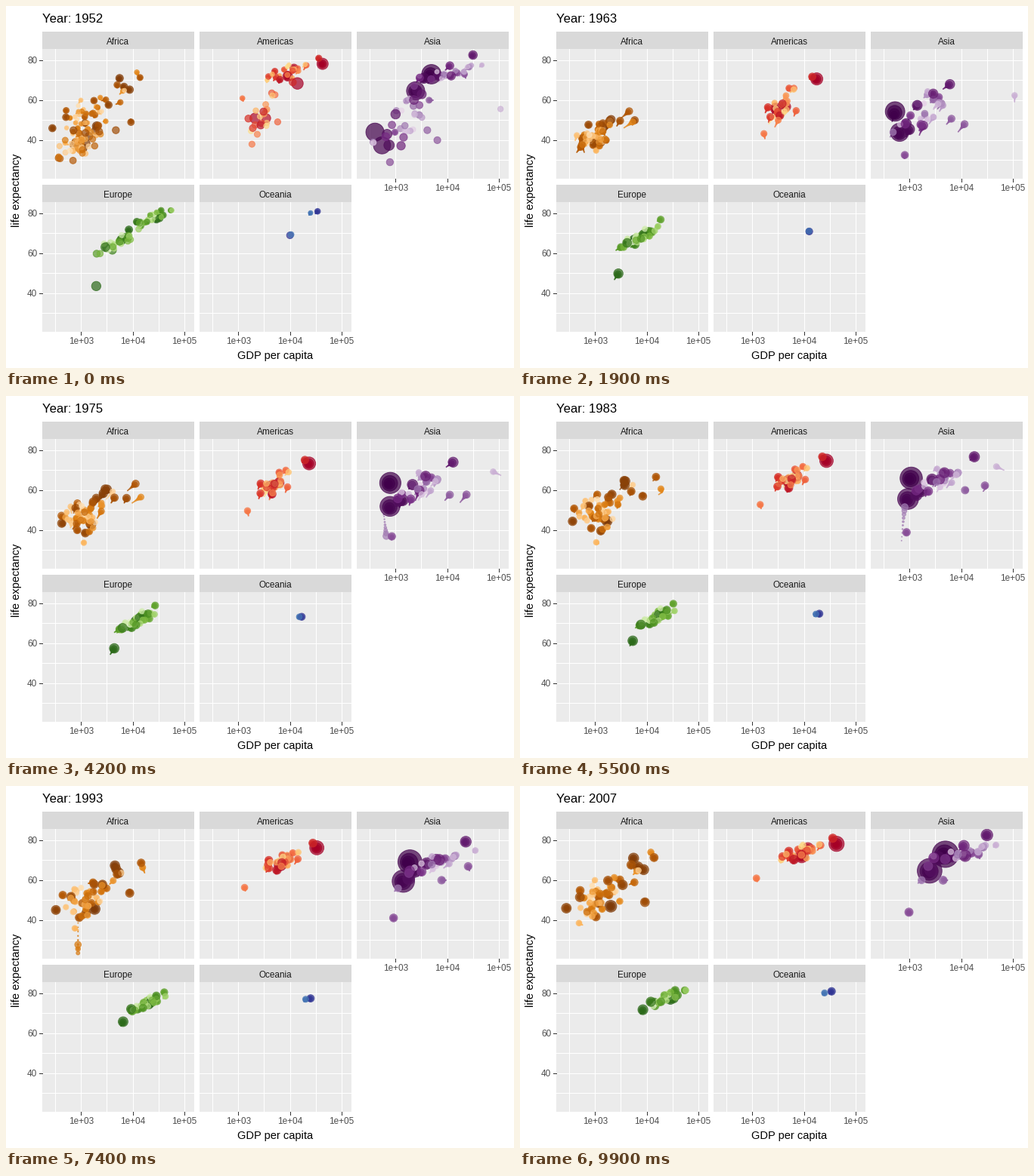
A matplotlib script for the animation above (10 s loop, 672 px wide and 480 px high).

```python
import numpy as np
import matplotlib.pyplot as plt
from matplotlib.animation import FuncAnimation
from matplotlib.colors import to_rgb
from matplotlib.patches import Rectangle

W, H, DPI = 672, 480, 96
FRAMES, WAKE = 100, 10
PX = 72 / DPI
plt.rcParams["font.family"] = "Liberation Sans"

YEARS = np.linspace(1952, 2007, FRAMES)
XLIM, YLIM = (2.24868, 5.18872), (20.649, 85.553)
PW, PH = 200.67, 172
rng = np.random.default_rng(12)


class Panel:
    """One continent; gains in life and GDP reach the given shares by midway."""

    def __init__(self, name, left, top, colors, growth, life_mid, gdp_mid):
        self.name, self.left, self.top = name, left, top
        self.colors, self.growth = colors.split(), growth
        self.mid = np.array([gdp_mid, life_mid])
        self.tracks = []

    def track(self, pop, points, dip=None):
        """Follow (log GDP, life) points spread evenly over the years."""
        points = np.array(points, float)
        if len(points) == 2:
            a, b = points
            points = np.array([a, a + (b - a) * self.mid, b])
        t = np.linspace(1952, 2007, len(points))
        x, y = (np.interp(YEARS, t, p) for p in points.T)
        if dip:
            year, depth = dip
            y = y - depth * np.clip(1 - abs(YEARS - year) / 6, 0, 1)
        p = pop * self.growth ** ((2007 - YEARS) / 55)
        size = 2 + 10 * np.sqrt(np.clip(p / 1318.7, 0, 1))
        self.tracks.append((pop, x, y, size))

    def add(self, pop, *values, dip=None):
        """Population in millions, then GDP and life pairs."""
        self.track(pop, list(zip(np.log10(values[::2]), values[1::2])), dip)

    def cloud(self, n, pops, gdp, life, gain, end, jitter=.3, rich=0):
        """Random countries: gdp (mean, sd), life (mean, slope, sd),
        gain in log GDP (mean, sd), final life (at 10k, slope, sd)."""
        def noise(sd):
            return sd * np.clip(rng.normal(), -1.9, 1.9)

        for i, pop in enumerate(rng.permutation(np.geomspace(*pops, n))):
            dx = noise(gdp[1])
            x0 = gdp[0] + dx
            y0 = life[0] + life[1] * dx + noise(life[2])
            x1 = x0 + gain[0] - .3 * dx + noise(gain[1]) + .6 * (i < rich)
            y1 = end[0] + end[1] * (x1 - 4) + noise(end[2])
            share = self.mid * (x1 - x0, y1 - y0)
            mid = (x0 + share[0] + noise(.15 * jitter),
                   y0 + share[1] + noise(4 * jitter))
            self.track(pop, [(x0, y0), mid, (x1, min(y1, 81.5))])


africa = Panel("Africa", 48, 57.2, "#7F3B08 #B35806 #E08214 #FDB863 #FEE0B6", .29, .75, .7)
americas = Panel("Americas", 256, 57.2, "#A50026 #D73027 #F46D43 #FDAE61 #FEE090", .42, .6, .55)
asia = Panel("Asia", 464, 57.2, "#40004B #762A83 #9970AB #C2A5CF #E7D4E8", .38, .62, .45)
europe = Panel("Europe", 48, 260.2, "#276419 #4D9221 #7FBC41 #B8E186 #E6F5D0", .75, .58, .65)
oceania = Panel("Oceania", 256, 260.2, "#313695 #4575B4", .45, .42, .5)
panels = [africa, americas, asia, europe, oceania]

africa.add(135, 1077, 36, 2014, 47)
africa.add(80, 1419, 42, 5581, 71)
africa.add(65, 781, 39, 278, 46)
africa.add(44, 4725, 45, 8300, 58, 9270, 49)
africa.add(6, 2388, 43, 20000, 59, 12057, 74)
africa.add(8.9, 493, 40, 880, 47, 863, 46, dip=(1992, 23))
africa.cloud(46, (.4, 76), (2.98, .22), (38.5, 12, 4.2), (.08, .2), (64, 13, 5),
             jitter=1, rich=10)

americas.add(301, 13990, 68.4, 42952, 78.2)
americas.add(33, 11367, 69, 36319, 81)
americas.add(190, 2109, 51, 9066, 72)
americas.add(109, 3478, 51, 11978, 76)
americas.add(8.5, 1840, 38, 1202, 61)
americas.cloud(20, (1, 44), (3.5, .16), (53, 25, 5.5), (.4, .15), (74.5, 8, 2))

asia.add(1318.7, 400, 44, 640, 62, 1400, 68, 4959, 73)
asia.add(1110, 547, 37.4, 830, 54.5, 2452, 64.7)
asia.add(223, 750, 37.5, 3541, 71)
asia.add(127, 3217, 63, 16800, 76, 31656, 82.6)
asia.add(169, 685, 43, 2606, 65)
asia.add(2.5, 108382, 55.6, 109000, 67.5, 32000, 74, 47307, 77.6)
asia.add(27.6, 6460, 40, 30000, 61, 21655, 73)
asia.add(27.5, 4130, 45, 13500, 60, 4471, 60)
asia.add(14, 368, 39, 1714, 60, dip=(1977, 18))
asia.add(32, 779, 29, 975, 44)
asia.cloud(23, (.7, 150), (3.2, .33), (49, 18, 5.5), (.68, .26), (73, 9, 2))

europe.add(71, 1969, 43.6, 8458, 71.8)
europe.cloud(29, (.3, 82), (3.72, .22), (65.5, 15, 1.8), (.7, .1), (73.5, 11, 1))

oceania.add(20.4, 10040, 69, 34435, 81)
oceania.add(4.1, 10557, 69.4, 25185, 80.2)

fig = plt.figure(figsize=(W / DPI, H / DPI), dpi=DPI, facecolor="white")


def text(x, y, s, pt, color="black", ha="center", **kw):
    return fig.text(x / W, 1 - y / H, s, fontsize=pt, color=color, ha=ha,
                    va="baseline", **kw)


def tick(x0, y0, x1, y1):
    fig.add_artist(plt.Line2D([x0 / W, x1 / W], [1 - y0 / H, 1 - y1 / H],
                              color="#333333", lw=PX, antialiased=False))


def ramp(colors, pops):
    """Darkest colour for the most populous country."""
    stops = np.array([to_rgb(c) for c in colors])
    rank = np.argsort(np.argsort(-pops))
    at = rank * (len(stops) - 1) / (len(pops) - 1)
    rgb = [np.interp(at, range(len(stops)), channel) for channel in stops.T]
    return np.column_stack(rgb + [np.full(len(pops), .7)])


def build(panel):
    left, top = panel.left, panel.top
    fig.add_artist(Rectangle((left / W, 1 - top / H), PW / W, 23.6 / H,
                             fc="#D9D9D9", lw=0))
    text(left + PW / 2, top - 6, panel.name, 8.8, "#1A1A1A")
    ax = fig.add_axes([left / W, 1 - (top + PH) / H, PW / W, PH / H],
                      facecolor="#EBEBEB", xlim=XLIM, ylim=YLIM, xticks=[], yticks=[])
    ax.spines[:].set_visible(False)
    grid = dict(color="white", lw=PX, zorder=.5, antialiased=False)
    for v in np.arange(2.5, 5.1, .5):
        ax.axvline(v, **grid)
    for v in range(30, 81, 10):
        ax.axhline(v, **grid)

    if left == 48:
        for v in (40, 60, 80):
            y = top + PH * (YLIM[1] - v) / (YLIM[1] - YLIM[0])
            tick(left - 3.67, y, left, y)
            text(left - 6.6, y + 4.3, v, 8.8, "#4D4D4D", "right")
    if top > 200 or panel is asia:
        for v in (3, 4, 5):
            x = left + PW * (v - XLIM[0]) / (XLIM[1] - XLIM[0])
            tick(x, top + PH, x, top + PH + 3.67)
            text(x, top + PH + 16, f"1e+0{v}", 8.8, "#4D4D4D")

    pops, xs, ys, sizes = (np.array(c) for c in zip(*panel.tracks))
    rgba = np.tile(ramp(panel.colors, pops), (WAKE, 1))
    blank = np.zeros(len(rgba))
    dots = ax.scatter(blank, blank, s=1, facecolors=rgba, edgecolors=rgba,
                      linewidths=.945 * PX)
    return dots, xs, ys, sizes


layers = [build(p) for p in panels]
title = text(48, 22, "", 12.5, ha="left")
text(356.3, 468, "GDP per capita", 11)
text(18.5, 244.6, "life expectancy", 11, rotation=90, rotation_mode="anchor")

# Each dot drags a wake of earlier positions that shrink with age.
AGE = np.arange(WAKE - 1, -1, -1)
FADE = (1 - AGE / WAKE) ** 3


def draw(i):
    title.set_text(f"Year: {round(YEARS[i])}")
    past = (i - AGE) % FRAMES
    for dots, xs, ys, sizes in layers:
        diameter = .75 * (sizes[:, past] * FADE * 2.845 + .945)
        dots.set_offsets(np.column_stack([xs[:, past].T.ravel(), ys[:, past].T.ravel()]))
        dots.set_sizes(diameter.T.ravel() ** 2)
    return [title, *(layer[0] for layer in layers)]


anim = FuncAnimation(fig, draw, frames=FRAMES, interval=100, repeat=True, blit=False)
plt.show()
```
